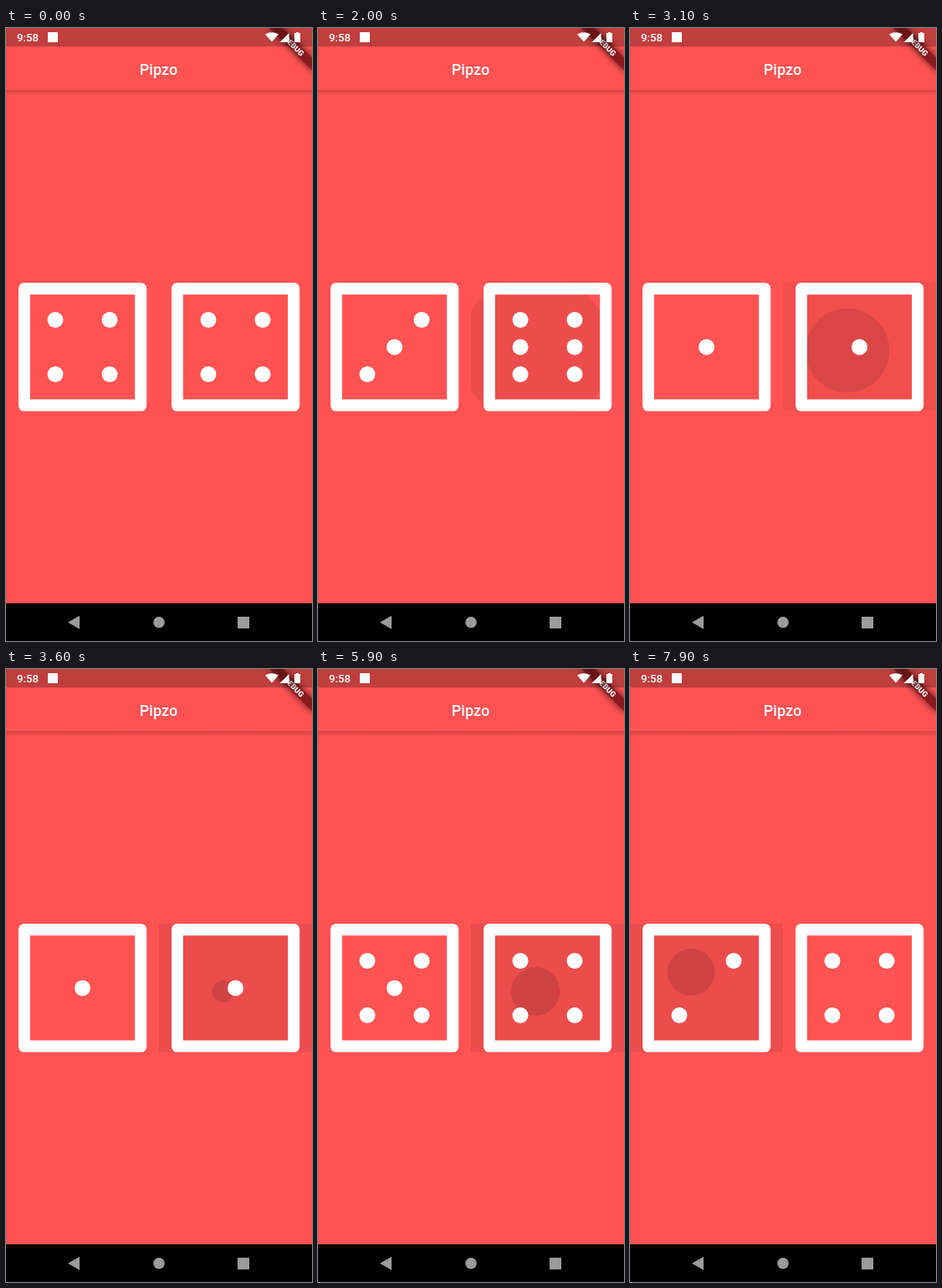
These frames come from a looping animation (366 by 732 pixels, 8000 ms). An HTML page with a canvas:

```html
<!DOCTYPE html>
<html lang="en">
<head>
<meta charset="utf-8">
<title>Pipzo</title>
<style>
  html, body { margin: 0; width: 100%; height: 100%; overflow: hidden; background: #000; }
  canvas { display: block; }
</style>
</head>
<body>
<canvas id="stage" width="366" height="732"></canvas>
<script>
const ctx = document.getElementById('stage').getContext('2d');
const LOOP = 8000, STEP = 100;
const CELL = { w: 183, top: 304, h: 153.5 };
const SCALE = 0.89; // stage pixels per logical pixel
const RED = '#ff5252';

const left = [62, 375], right = [260, 385];
const taps = [
  { down: 1000, up: 1026, at: left, dice: [2, 5] },
  { down: 1400, up: 1460, at: left, dice: [4, 3] },
  { down: 1890, up: 1900, at: right, dice: [3, 6] },
  { down: 2390, up: 2496, at: right, dice: [5, 1] },
  { down: 2950, up: 3060, at: right, dice: [1, 1] },
  { down: 3502, up: 3640, at: right, dice: [4, 5] },
  { down: 4690, up: 4695, at: right, dice: [2, 4] },
  { down: 5185, up: 5195, at: right, dice: [5, 4] },
  { down: 5682, up: 5940, at: right, dice: [3, 6] },
  { down: 6220, up: 6360, at: right, dice: [6, 2] },
  { down: 6995, up: 7100, at: left, dice: [2, 4] },
  { down: 7707, up: LOOP, at: [73, 362], dice: [4, 4] }
];

const clamp = v => Math.max(0, Math.min(1, v));

function rect(x, y, w, h, fill) {
  ctx.fillStyle = fill;
  ctx.fillRect(x, y, w, h);
}

function circle(x, y, r, fill) {
  ctx.fillStyle = fill;
  ctx.beginPath();
  ctx.arc(x, y, r, 0, 2 * Math.PI);
  ctx.fill();
}

function polygon(fill, ...points) {
  ctx.fillStyle = fill;
  ctx.beginPath();
  points.forEach(p => ctx.lineTo(...p));
  ctx.fill();
}

function text(str, x, y, font, align = 'center') {
  ctx.font = font + ' Roboto, sans-serif';
  ctx.textAlign = align;
  ctx.fillStyle = '#fff';
  ctx.fillText(str, x, y);
}

function drawInk({ down, up, at: [x, y] }, t) {
  if (t < down || t > up + 300) return;
  const cellX = x < CELL.w ? 0 : CELL.w;
  const maxRadius = Math.hypot(
    Math.max(x - cellX, cellX + CELL.w - x),
    Math.max(y - CELL.top, CELL.top + CELL.h - y));
  const held = Math.min(t, up) - down;
  const released = Math.max(0, t - up);
  // The ripple spreads slowly while held and quickly once released.
  const growth = clamp(held / 1000 + released * SCALE / maxRadius);
  const highlight = clamp(clamp(held / 100) - released / 100);
  ctx.save();
  ctx.beginPath();
  ctx.rect(cellX, CELL.top, CELL.w, CELL.h);
  ctx.clip();
  rect(cellX, CELL.top, CELL.w, CELL.h, `rgba(0,0,0,${0.08 * highlight})`);
  circle(x, y, maxRadius * growth, `rgba(0,0,0,${0.12 * clamp(1 - released / 260)})`);
  ctx.restore();
}

function drawDie(x, value) {
  ctx.fillStyle = '#fff';
  ctx.beginPath();
  ctx.roundRect(x + 15, 304.3, 153.2, 153.3, 6.5);
  ctx.rect(x + 28.8, 318.2, 125.4, 125.4);
  ctx.fill('evenodd');
  const pip = (col, row) => circle(x + 91.5 + col * 32.5, 381 + row * 32.5, 9.5, '#fff');
  if (value % 2) pip(0, 0);
  if (value > 1) { pip(1, -1); pip(-1, 1); }
  if (value > 3) { pip(-1, -1); pip(1, 1); }
  if (value > 5) { pip(-1, 0); pip(1, 0); }
}

function drawAppBar() {
  const shadow = ctx.createLinearGradient(0, 74, 0, 81);
  shadow.addColorStop(0, 'rgba(0,0,0,.18)');
  shadow.addColorStop(1, 'rgba(0,0,0,0)');
  rect(0, 74, 366, 7, shadow);
  text('Pipzo', 182.5, 55.5, '500 18px');
}

function drawBanner() {
  ctx.save();
  ctx.translate(366, 0);
  ctx.rotate(Math.PI / 4);
  ctx.shadowColor = 'rgba(0,0,0,.8)';
  ctx.shadowBlur = 8;
  rect(-36, 25, 72, 10.7, 'rgba(140,24,28,.85)');
  ctx.shadowColor = 'transparent';
  text('DEBUG', 0, 33.6, '900 9.1px');
  ctx.restore();
}

function drawStatusBar() {
  rect(0, 0, 366, 22, 'rgba(0,0,0,.25)');
  text('9:58', 13, 16.3, '500 13.2px', 'left');
  rect(50, 5, 12, 12, '#fff');
  ctx.fillStyle = '#fff';
  ctx.beginPath();
  ctx.moveTo(318, 16.5);
  ctx.lineTo(310, 7.5);
  ctx.quadraticCurveTo(318, 2.8, 326, 7.5);
  ctx.fill();
  polygon('#fff', [327.5, 17], [338.5, 17], [338.5, 6]);
  rect(345, 6, 7, 11, '#fff');
  rect(347, 5, 3, 1, '#fff');
}

function drawNavBar() {
  rect(0, 687, 366, 45, '#000');
  polygon('#9b9b9b', [74, 709.7], [88, 701.7], [88, 717.7]);
  circle(183, 709.7, 6.8, '#9b9b9b');
  rect(277, 703, 14, 14, '#9b9b9b');
}

function draw(t) {
  rect(0, 0, 366, 732, RED);
  drawAppBar();
  taps.forEach(tap => drawInk(tap, t));
  const dice = taps.reduce((shown, tap) => t >= tap.up ? tap.dice : shown, [4, 4]);
  dice.forEach((value, i) => drawDie(i * CELL.w, value));
  drawBanner();
  drawStatusBar();
  drawNavBar();
}

const start = performance.now();
function frame() {
  const t = (performance.now() - start) % LOOP;
  draw(Math.floor(t / STEP) * STEP);
  requestAnimationFrame(frame);
}
frame();
</script>
</body>
</html>
```
